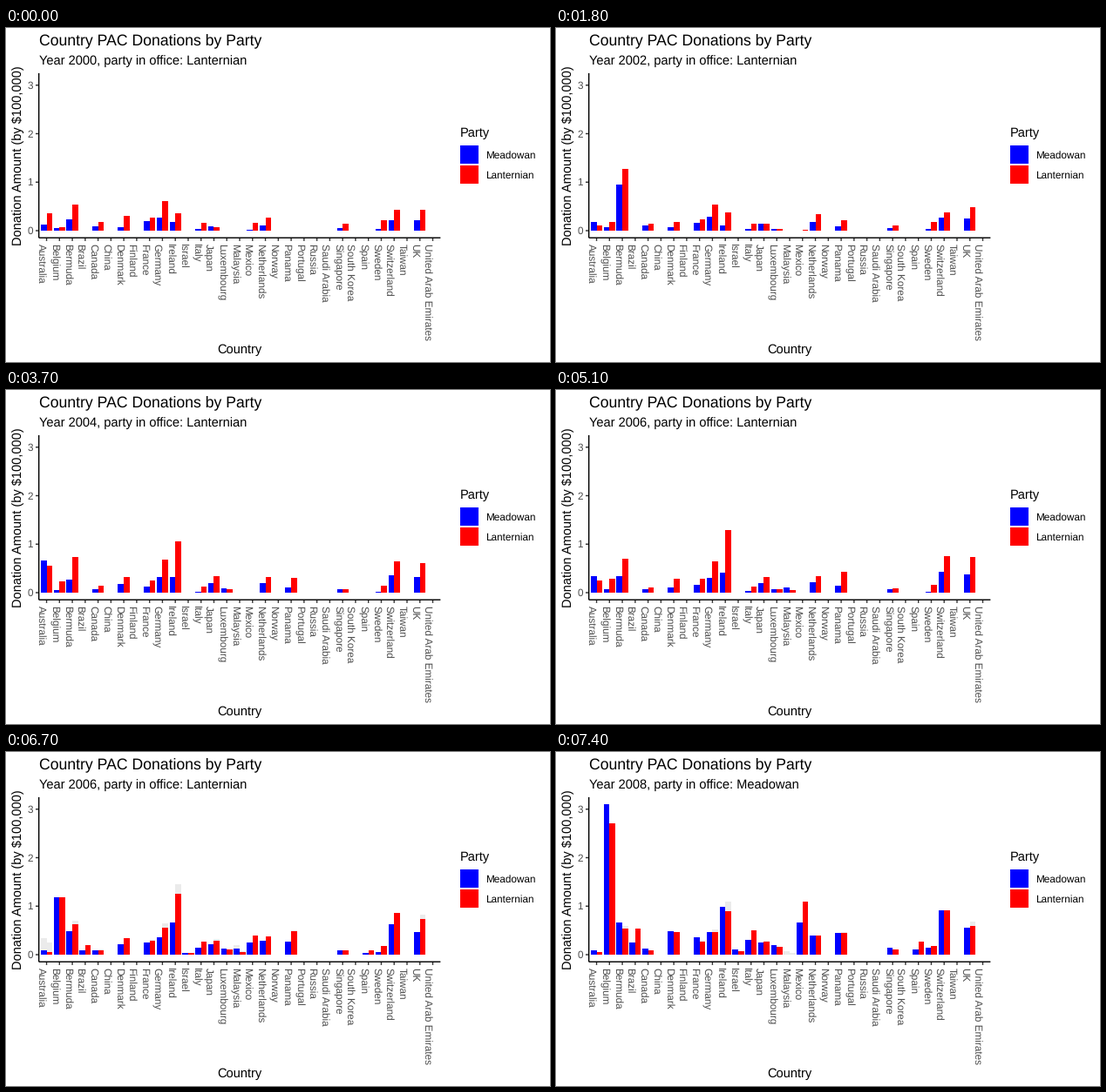
These frames come from a looping animation (624 by 384 pixels, 8000 ms). A matplotlib script:

```python
import numpy as np
import matplotlib.pyplot as plt
from matplotlib.animation import FuncAnimation
from matplotlib.patches import Rectangle

plt.rcParams.update({
    "font.family": "Liberation Sans",
    "text.hinting": "none",
    "toolbar": "None",
})

WIDTH, HEIGHT, DPI = 624, 384, 96
FRAMES, INTERVAL = 80, 100

COUNTRIES = [
    "Australia", "Belgium", "Bermuda", "Brazil", "Canada", "China", "Denmark",
    "Finland", "France", "Germany", "Ireland", "Israel", "Italy", "Japan",
    "Luxembourg", "Malaysia", "Mexico", "Netherlands", "Norway", "Panama",
    "Portugal", "Russia", "Saudi Arabia", "Singapore", "South Korea", "Spain",
    "Sweden", "Switzerland", "Taiwan", "UK", "United Arab Emirates",
]
PARTIES = {"Meadowan": "#0000FF", "Lanternian": "#FF0000"}
FIRST_PARTY, SECOND_PARTY = PARTIES

# Donations in thousands of dollars: (first party, second party)
donations_2000 = dict(
    Australia=(12, 36), Belgium=(5, 7), Bermuda=(23, 54), Canada=(9, 18),
    Denmark=(7, 30), France=(20, 27), Germany=(27, 61), Ireland=(18, 36),
    Italy=(3, 16), Japan=(9, 7), Mexico=(1, 16), Netherlands=(11, 27),
    Singapore=(5, 14), Sweden=(3, 21), Switzerland=(22, 43), UK=(22, 43))
donations_2002 = dict(
    Australia=(18, 10), Belgium=(7, 18), Bermuda=(95, 127), Canada=(10, 14),
    Denmark=(7, 18), France=(16, 23), Germany=(29, 54), Ireland=(11, 38),
    Italy=(3, 14), Japan=(14, 14), Luxembourg=(3, 3), Mexico=(0, 2),
    Netherlands=(18, 34), Panama=(9, 21), Singapore=(5, 10), Sweden=(3, 18),
    Switzerland=(27, 38), UK=(25, 48))
donations_2004 = dict(
    Australia=(66, 55), Belgium=(5, 23), Bermuda=(27, 73), Canada=(7, 14),
    Denmark=(18, 32), France=(12, 25), Germany=(32, 68), Ireland=(32, 106),
    Italy=(1, 12), Japan=(20, 34), Luxembourg=(9, 7), Netherlands=(20, 32),
    Panama=(10, 30), Singapore=(7, 7), Sweden=(1, 14), Switzerland=(36, 64),
    UK=(32, 61))
donations_2006 = dict(
    Australia=(10, 5), Belgium=(8, 32), Bermuda=(38, 67), Canada=(6, 8),
    Denmark=(5, 26), France=(18, 31), Germany=(29, 62), Ireland=(48, 145),
    Italy=(4, 13), Japan=(19, 31), Luxembourg=(7, 7), Malaysia=(19, 8),
    Netherlands=(22, 35), Panama=(16, 51), Singapore=(7, 9), Sweden=(1, 17),
    Switzerland=(47, 83), UK=(41, 82))
donations_2008 = dict(
    Australia=(9, 5), Belgium=(310, 270), Bermuda=(66, 54), Brazil=(25, 53),
    Canada=(12, 9), Denmark=(48, 47), France=(36, 27), Germany=(46, 46),
    Ireland=(98, 90), Israel=(10, 8), Italy=(30, 50), Japan=(25, 27),
    Luxembourg=(20, 16), Mexico=(67, 110), Netherlands=(40, 40),
    Panama=(44, 45), Singapore=(14, 11), Spain=(11, 27), Sweden=(14, 18),
    Switzerland=(92, 92), UK=(55, 59))


def to_array(donations):
    return np.array([donations.get(c, (0, 0)) for c in COUNTRIES]) / 100


STATES = [to_array(d) for d in (donations_2000, donations_2002, donations_2004,
                                donations_2006, donations_2008)]
IN_OFFICE = [SECOND_PARTY] * 4 + [FIRST_PARTY]

# Timing, in frames
FIRST_MOVE, PERIOD = 7, 19
STEPS = [12, 12, 12, 11]
LABEL_STEP = 7
LASTING_SHADOW = 2  # moves from here on keep their shadow while resting

# Layout, in pixels from the top left
LEFT, RIGHT, TOP, BOTTOM = 37.68, 498.38, 51.9, 241.2
ZERO, UNIT = 233.0, 55.75
SLOT = (RIGHT - LEFT) / (len(COUNTRIES) + 0.2)
BAR = 0.45 * SLOT
TICK = 3.67
LINE = 1.07
MID_X, MID_Y = (LEFT + RIGHT) / 2, (TOP + BOTTOM) / 2
SMALL, NORMAL, LARGE = 8.8, 11, 13.2
GREY_TICK, GREY_TEXT, GREY_SHADOW = "#333333", "#4D4D4D", "#EBEBEB"

fig = plt.figure(figsize=(WIDTH / DPI, HEIGHT / DPI), dpi=DPI, facecolor="white")
ax = fig.add_axes([0, 0, 1, 1])
ax.set_xlim(0, WIDTH)
ax.set_ylim(HEIGHT, 0)
ax.axis("off")


def center(index):
    return LEFT + (0.6 + index) * SLOT


def label(x, y, text, size, color="black", ha="left", rotation=0):
    return ax.text(x, y, text, fontsize=size, color=color, ha=ha, va="baseline",
                   rotation=rotation, rotation_mode="anchor")


def line(xs, ys, color):
    ax.plot(xs, ys, color=color, lw=LINE, solid_capstyle="butt", snap=False,
            zorder=4)


def box(x0, y0, x1, y1, color, zorder=2):
    x0, y0, x1, y1 = (round(v) for v in (x0, y0, x1, y1))
    return ax.add_patch(Rectangle((x0, y0), x1 - x0, y1 - y0, fc=color, lw=0,
                                  snap=False, zorder=zorder))


def draw_axes():
    for value in range(4):
        y = ZERO - value * UNIT
        line([LEFT - TICK, LEFT], [y, y], GREY_TICK)
        label(30.8, y + 4.2, str(value), SMALL, GREY_TEXT, ha="right")
    for i, country in enumerate(COUNTRIES):
        x = center(i)
        line([x, x], [BOTTOM, BOTTOM + TICK], GREY_TICK)
        label(x - 9.3, 248.2, country, SMALL, GREY_TEXT, rotation=-90)
    line([LEFT, LEFT], [TOP, BOTTOM], "black")
    line([LEFT, RIGHT], [BOTTOM, BOTTOM], "black")
    label(MID_X - 0.4, 373.6, "Country", NORMAL, ha="center")
    label(18, MID_Y, r"Donation Amount (by \$100,000)", NORMAL, ha="center",
          rotation=90)


def draw_legend():
    label(520.5, 124.8, "Party", NORMAL)
    for row, (party, color) in enumerate(PARTIES.items()):
        y = 134.2 + 23.04 * row
        box(521.4, y + 0.95, 542.4, y + 22.1, color)
        label(550, y + 15.7, party, SMALL)


def make_bars(colors, zorder):
    return [[box(center(i) + (side - 1) * BAR, ZERO, center(i) + side * BAR, ZERO,
                 color, zorder) for side, color in enumerate(colors)]
            for i in range(len(COUNTRIES))]


def set_heights(bars, values):
    for pair, amounts in zip(bars, values):
        for bar, amount in zip(pair, amounts):
            top = round(ZERO - amount * UNIT)
            bar.set_y(top)
            bar.set_height(ZERO - top)


def blend(move, step):
    share = step / STEPS[move]
    return STATES[move] * (1 - share) + STATES[move + 1] * share


def shadow_values(move, step):
    """Greatest heights reached earlier under the current year."""
    if step < LABEL_STEP:
        if move > LASTING_SHADOW:
            return np.maximum(STATES[move], blend(move - 1, LABEL_STEP))
        return STATES[move]
    if step < STEPS[move] or move >= LASTING_SHADOW:
        return blend(move, LABEL_STEP)
    return np.zeros_like(STATES[0])


draw_axes()
draw_legend()
label(LEFT, 19.2, "Country PAC Donations by Party", LARGE)
subtitle = label(LEFT, 41.8, "", NORMAL)
shadows = make_bars([GREY_SHADOW] * 2, zorder=1)
bars = make_bars(PARTIES.values(), zorder=2)


def update(frame):
    if frame < FIRST_MOVE:
        year, values, shadow = 0, STATES[0], np.zeros_like(STATES[0])
    else:
        move, elapsed = divmod(frame - FIRST_MOVE, PERIOD)
        step = min(elapsed + 1, STEPS[move])
        year = move + (step >= LABEL_STEP)
        values, shadow = blend(move, step), shadow_values(move, step)
    set_heights(bars, values)
    set_heights(shadows, shadow)
    subtitle.set_text(f"Year {2000 + 2 * year}, party in office: {IN_OFFICE[year]}")
    return []


animation = FuncAnimation(fig, update, frames=FRAMES, interval=INTERVAL,
                          init_func=lambda: update(0), repeat=True,
                          repeat_delay=0, blit=False)
plt.show()
```
